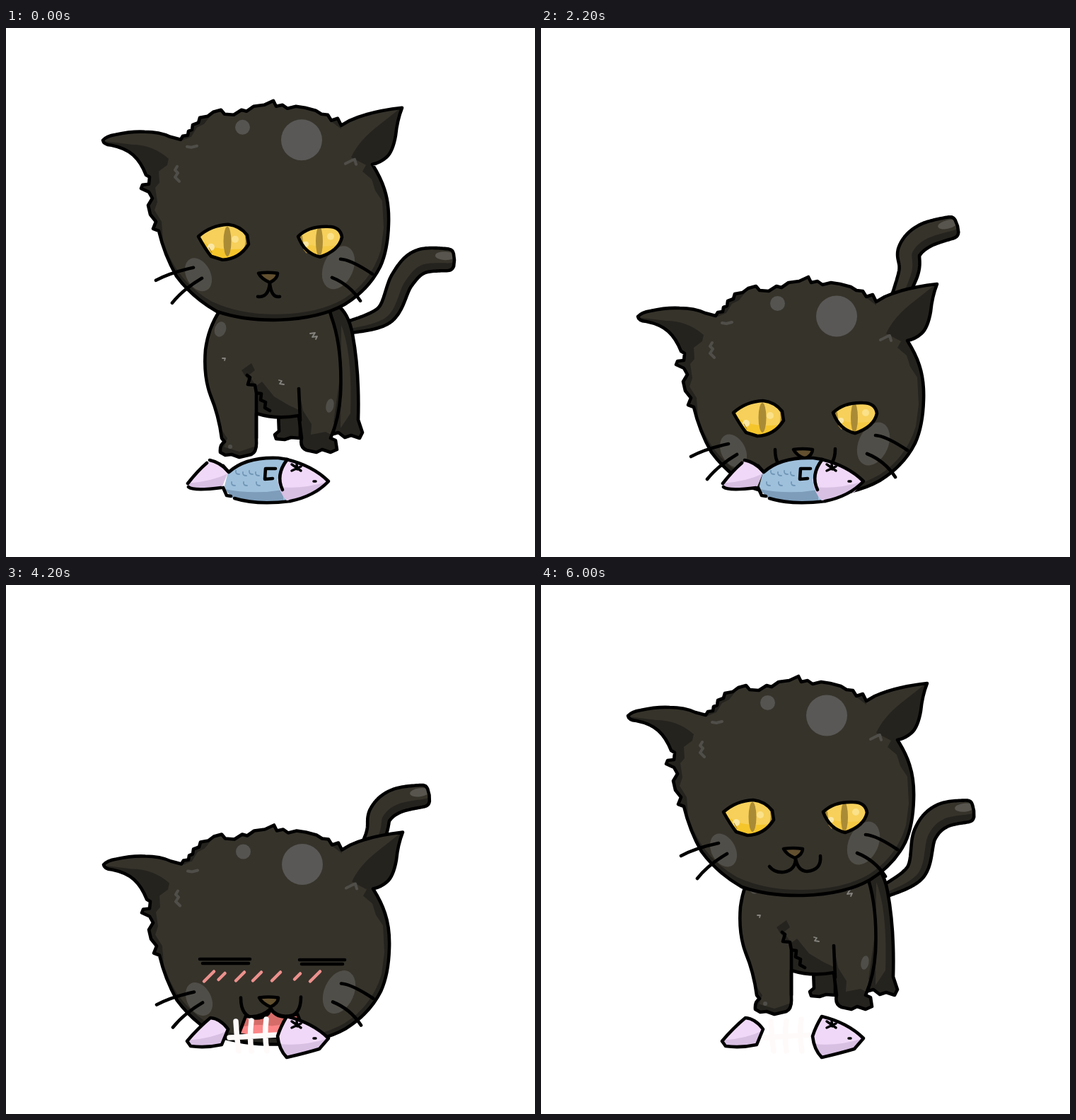
Animation of 748 by 748 pixels, one loop 6200 ms. Source, as an HTML page:

```html
<!DOCTYPE html>
<html lang="en">
<head>
<meta charset="utf-8">
<title>Hungry cat</title>
<style>
  html, body { margin: 0; width: 100%; height: 100%; overflow: hidden; background: #fff; }
  svg { display: block; width: 100vw; height: 100vh; }
  .ink { stroke: #000; stroke-width: 4.6; stroke-linecap: round; stroke-linejoin: round; }
  .line { fill: none; }
  .fur { fill: #36332b; }
  .dark { fill: #25231e; }
  .spot { fill: #504e48; }
  .mark { fill: none; stroke: #504e48; stroke-width: 4; stroke-linecap: round; stroke-linejoin: round; }
  .fine { stroke: #85837e; stroke-width: 1.8; }
  .pink { fill: #f0d9f8; }
  .lilac { fill: #d8c0e3; }
  .blue { fill: #9fc0db; }
  .steel { fill: #7d9dba; }
  .flesh { fill: #df4544; }
  .bone { fill: none; stroke: #fffafa; stroke-width: 7.5; stroke-linecap: round; }
</style>
</head>
<body>
<svg viewBox="0 0 748 748">
  <defs>
    <path id="skull" d="M137 158Q142 152 155 150Q177 145 196 146Q217 146 232 153L247 157L250 152L257 151L258 145L263 143L264 136L272 133L274 126L285 124L293 118L304 115L309 121L322 122L333 115L340 117L350 110L365 108L378 102L382 110L391 108L398 113L410 110L423 112L438 116L446 121L455 122L460 130L469 127L474 137L486 130Q515 117 560 112Q553 130 551 151Q547 174 538 182Q529 190 518 192Q530 211 535 227Q542 248 541 276Q540 313 529 337Q513 369 479 390Q444 410 385 412Q336 413 298 400Q263 380 241 350Q224 320 216 286L208 283L212 273L204 263L201 250L207 240L202 231L191 226L193 221L202 220L203 210L198 207Q191 189 180 179Q169 169 149 165Q138 164 137 158Z"/>
    <path id="torso" d="M302 400Q286 424 282 455Q279 492 289 519Q301 548 305 580L309 585Q302 589 303 600L310 604L319 603L330 607L347 603Q355 599 354 584L354 545Q383 554 414 548L418 580Q415 593 425 597L439 600L447 596L459 600L468 596L466 583L459 580Q471 552 473 518Q476 452 460 408L452 380H315Z"/>
    <path id="eyeL" d="M272 293Q290 277 314 276Q331 278 341 291L343 304Q330 325 306 326L290 321Q282 311 272 293Z"/>
    <path id="eyeR" d="M413 293Q428 278 455 279Q473 279 475 294Q471 313 444 322Q422 317 413 293Z"/>
    <path id="fishBody" d="M314 628Q339 606 385 608Q424 609 457 641Q434 662 402 669Q355 676 320 664L308 651Z"/>
    <path id="finPath" d="M289 612Q303 613 314 628L305 650Q282 655 261 652L256 645Q271 627 289 612Z"/>
    <path id="cheekPath" d="M397 610Q434 619 456 641L443 656Q423 662 397 668Q386 657 384 638Q388 625 397 610Z"/>
    <path id="gapePath" d="M338 372Q358 376 373 362Q386 378 411 369L422 397Q376 406 328 398Z"/>
    <clipPath id="inSkull"><use href="#skull"/></clipPath>
    <clipPath id="inTorso"><use href="#torso"/></clipPath>
    <clipPath id="inEyeL"><use href="#eyeL"/></clipPath>
    <clipPath id="inEyeR"><use href="#eyeR"/></clipPath>
    <clipPath id="inFish"><use href="#fishBody"/></clipPath>
    <clipPath id="inFin"><use href="#finPath"/></clipPath>
    <clipPath id="inCheek"><use href="#cheekPath"/></clipPath>
    <clipPath id="inGape"><use href="#gapePath"/></clipPath>
  </defs>

  <g id="tail">
    <path id="tailFur" class="fur"/>
    <path id="tailShade" class="dark"/>
    <ellipse id="tailShine" rx="14" ry="6" fill="#57554e"/>
    <path id="tailEdge" class="ink line"/>
  </g>

  <g id="body">
    <path class="ink dark" d="M385 545L386 570L380 575L382 581L394 582L403 579L416 580V545Z"/>
    <path class="ink dark" d="M455 385L468 392Q484 402 490 433Q500 487 498 554L504 572L500 580L488 576L479 579L470 572L463 574Z"/>
    <path class="fur" d="M474 420Q490 460 487 545L473 566Z"/>
    <use href="#torso" class="fur"/>
    <g clip-path="url(#inTorso)">
      <path class="dark" d="M333 484L347 474L352 484L343 491L354 506L362 500L379 521L399 533L414 540V556H353V510L338 492ZM414 510L420 541L432 560L431 575L452 571L469 580V604H416ZM278 480Q293 555 313 580L304 604L296 590ZM474 480L463 558L480 550ZM303 591L330 599L354 591V609H303Z"/>
      <ellipse class="spot" cx="303" cy="426" rx="8" ry="11" transform="rotate(20 303 426)"/>
      <ellipse class="spot" cx="458" cy="534" rx="5.5" ry="10" transform="rotate(12 458 534)"/>
      <circle class="spot" cx="317" cy="592" r="3"/>
    </g>
    <use href="#torso" class="ink line"/>
    <path class="ink line" d="M341 491L345 494L342 504L352 505L354 516L361 517L360 526L367 529L366 537L373 541M354 515V580M414 510L416 555"/>
    <path class="mark fine" d="M430 432L437 431L433 437L440 436L438 440M306 467L310 467L309 470M386 498L390 499L387 503L393 504"/>
  </g>

  <g id="head">
    <use href="#skull" class="fur"/>
    <g clip-path="url(#inSkull)">
      <path class="dark" d="M130 158L177 164Q207 164 230 184L228 193L216 202L217 218L211 225L214 245L210 257L220 273L222 299Q239 356 291 386Q332 405 385 404Q442 403 478 382Q517 357 530 313L534 282L532 244L522 229L517 213L504 202L509 193L488 182Q498 160 523 140L561 110L570 420H130Z"/>
      <path class="dark" d="M246 154L257 148L263 140L274 133L276 124L292 120L280 135L270 140L262 153L250 158ZM448 119L474 128V142L462 133Z"/>
    </g>
    <circle cx="418" cy="157.500" r="29" fill="#595856"/>
    <circle cx="334.500" cy="139.500" r="10.500" fill="#555450"/>
    <path class="mark" d="M242 195L239 200L243 204L239 210L245 216M256 167L262 168L270 166M480 191L490 186L493 185L495 192"/>
    <ellipse class="spot" cx="272" cy="348" rx="17" ry="25" transform="rotate(-28 272 348)"/>
    <ellipse class="spot" cx="470" cy="338" rx="21" ry="32" transform="rotate(24 470 338)"/>
    <use href="#skull" class="ink line"/>
    <path class="ink line" d="M212 356Q232 345 265 338M235 388Q250 369 277 353M473 326Q488 327 518 347M461 352Q486 362 501 385"/>

    <g id="eyesOpen" transform="translate(0 1)">
      <g clip-path="url(#inEyeL)">
        <path fill="#f6d05a" d="M265 270H350V330H265Z"/>
        <path fill="#f5c52c" d="M270 290Q287 318 344 309V330H270Z"/>
        <ellipse cx="313" cy="300" rx="5.500" ry="21" fill="#aa8b35"/>
        <path fill="#aa8b35" d="M336 286L346 300L334 314Q342 302 336 286Z"/>
        <circle cx="290" cy="308" r="5" fill="#fbe7a5"/>
        <circle cx="324" cy="297" r="5" fill="#fbe18a"/>
      </g>
      <g clip-path="url(#inEyeR)">
        <path fill="#f6d05a" d="M405 270H480V325H405Z"/>
        <path fill="#f5c944" d="M410 295Q430 313 475 304V325H410Z"/>
        <ellipse cx="443" cy="300" rx="5" ry="21" fill="#aa8b35"/>
        <path fill="#aa8b35" d="M413 293L419 292L422 316L414 306Z"/>
        <circle cx="424" cy="304" r="4" fill="#fbe7a5"/>
        <circle cx="459" cy="293" r="5" fill="#fbe18a"/>
      </g>
      <path class="mark" style="stroke:#b79131;stroke-width:1.300" d="M283 309L287 315M287 309L291 316M421 311L425 316M424 310L428 314"/>
      <use href="#eyeL" class="ink line"/>
      <use href="#eyeR" class="ink line"/>
    </g>
    <path id="eyesShut" class="ink line" d="M273 291.500H344M277 297.500H342M414 292.500H478M417 298.500H475"/>
    <path id="blush" class="mark" style="stroke:#ec918d;stroke-width:4.500"/>

    <g id="gape">
      <use href="#gapePath" fill="#d66c68"/>
      <path clip-path="url(#inGape)" fill="#fc8687" d="M325 389Q352 382 375 386Q402 381 425 388V408H325Z"/>
      <path fill="#fff" d="M341 374L349 374L346 386ZM394 373L403 372L400 384Z"/>
      <use href="#gapePath" class="ink line"/>
    </g>
    <path id="drool" fill="#a6e5f7" d="M383 379L390 376L401 374L404 383L399 386L399 392L393 388L387 386Z"/>
    <path id="lips" class="ink line"/>
    <path class="ink" fill="#62502f" d="M357 346Q370 344 384 346Q384 354 373 359Q361 354 357 346Z"/>
  </g>

  <g id="fish">
    <use href="#finPath" class="pink"/>
    <path clip-path="url(#inFin)" class="lilac" d="M250 644Q288 643 316 629V657H250Z"/>
    <path id="finEdge" class="ink line"/>

    <g id="flank">
      <g clip-path="url(#inFish)">
        <path id="meat" class="blue"/>
        <path class="steel" d="M300 650Q345 661 392 653V678H300Z"/>
        <path id="scales" class="mark" style="stroke:#7197b7;stroke-width:1.800"/>
      </g>
      <path class="ink line" d="M307 650L312 661L318 662M323 665Q355 675 402 669"/>
    </g>
    <path id="back" class="ink line" d="M307 619L315 628Q339 606 385 608L398 610"/>
    <path id="hook" class="ink line" d="M381 623L367 623L366 638L377 637"/>
    <g id="bite">
      <path class="ink flesh" d="M314 622Q317 630 329 629Q344 632 356 627Q370 627 378 615Q379 627 367 632Q343 638 315 630Z"/>
      <path class="bone" d="M325 617V629M346 615L344 631M367 613L365 626"/>
    </g>
    <g id="wound">
      <path class="ink flesh" d="M315 631Q350 622 388 631L390 654L380 655Q374 665 362 657Q354 666 343 659Q330 663 328 654Q314 653 313 640Z"/>
      <path class="dark" d="M316 630Q350 621 387 630L386 635Q350 628 316 636Z"/>
    </g>
    <path id="bones" class="bone"/>

    <use href="#cheekPath" class="pink"/>
    <path clip-path="url(#inCheek)" class="lilac" d="M380 648Q416 654 459 640V675H380Z"/>
    <path id="cheekEdge" class="ink line"/>
    <path class="ink line" style="stroke-width:3.500" d="M404 617L417 626M404 626L417 620M411 617L412 624M435 641L438 641"/>
  </g>
</svg>
<script>
const LOOP = 6200, STEP = 200;
const $ = id => document.getElementById(id);
const draw = (id, d) => $(id).setAttribute('d', d);
const show = (id, on) => { $(id).style.display = on ? '' : 'none'; };

// Head offset: time, x, y
const headKeys = [
  [0, 0, 0.8], [800, 0, 158], [1200, 0, 158], [1800, 0, 203.5], [2200, 0, 250],
  [2800, 0, 250], [3200, 0, 250], [3600, 1, 225], [4000, 1, 250],
  [4400, 1, 225], [4800, 1, 250], [5600, -22, 70], [6000, -14, 27]
];

// Tail centre lines from root to tip
const pose = {
  low: [482, 424, 536, 405, 560, 356, 587, 330, 634, 328],
  right: [485, 424, 536, 393, 563, 358, 598, 350, 645, 374],
  up: [490, 420, 509, 330, 502, 298, 513, 267, 541, 244],
  swing: [490, 420, 531, 360, 538, 318, 560, 297, 609, 287],
  curl: [490, 420, 519, 348, 521, 315, 544, 293, 589, 280],
  flat: [485, 424, 530, 378, 555, 350, 582, 340, 627, 348],
  rest: [484, 434, 530, 405, 543, 352, 568, 326, 612, 319]
};
const tailKeys = [
  [0, 'low'], [800, 'right'], [1200, 'flat'], [1800, 'up'], [2200, 'curl'], [2400, 'up'],
  [2800, 'swing'], [3200, 'low'], [3600, 'curl'], [4000, 'curl'], [4800, 'flat'], [6000, 'rest']
].map(([time, name]) => [time, ...pose[name]]);

const lips = {
  frown: 'M356 379Q371 381 373 360Q375 381 387 379',
  smile: 'M337 371Q344 380 357 379Q374 376 374 360Q377 377 390 378Q411 376 409 356',
  wide: 'M331 346Q331 374 352 375Q372 374 373 360Q379 374 397 373Q416 371 416 345'
};

function sample(keys, t) {
  const i = keys.findIndex(k => k[0] > t);
  if (i < 0) return keys[keys.length - 1].slice(1);
  const a = keys[i - 1], b = keys[i], u = (t - a[0]) / (b[0] - a[0]);
  return a.slice(1).map((v, n) => v + (b[n + 1] - v) * u);
}

// Catmull-Rom value through a list at position s
function spline(list, s) {
  const last = list.length - 1, i = Math.min(Math.floor(s), last - 1), u = s - i;
  const at = n => list[Math.max(0, Math.min(last, n))];
  const [a, b, c, d] = [at(i - 1), at(i), at(i + 1), at(i + 2)];
  return b + u / 2 * (c - a + u * (2 * a - 5 * b + 4 * c - d + u * (3 * (b - c) + d - a)));
}

function drawTail(points) {
  const xs = points.filter((_, i) => i % 2 === 0), ys = points.filter((_, i) => i % 2);
  const widths = [8, 13.5, 16, 17, 15], tipStart = 3.6;
  const edge = (s, side) => {
    const e = 0.02, s0 = Math.max(0, s - e), s1 = Math.min(4, s + e);
    const dx = spline(xs, s1) - spline(xs, s0), dy = spline(ys, s1) - spline(ys, s0);
    const round = Math.max(0, (s - tipStart) / (4 - tipStart));
    const cap = Math.sqrt(Math.max(0, 1 - round ** 4));
    const w = spline(widths, s) * cap * side / Math.hypot(dx, dy);
    return [spline(xs, s) - dy * w, spline(ys, s) + dx * w];
  };
  const ribbon = (from, to) => {
    const near = [], far = [];
    for (let i = 0; i <= 100; i++) {
      near.push(edge(i / 25, from));
      far.unshift(edge(i / 25, to));
    }
    return 'M' + [...near, ...far].map(p => p.map(v => v.toFixed(1)).join(' ')).join('L') + 'Z';
  };
  draw('tailFur', ribbon(-1, 1));
  draw('tailEdge', ribbon(-1, 1));
  draw('tailShade', ribbon(0.3, 1));
  const [x, y] = edge(3.66, -0.35), [a, b] = edge(3.5, 0), [c, d] = edge(3.8, 0);
  const angle = Math.atan2(d - b, c - a) * 180 / Math.PI;
  $('tailShine').setAttribute('transform', `translate(${x} ${y}) rotate(${angle})`);
}

function drawFish(t) {
  const stage = t < 2600 ? 0 : t < 3400 ? 1 : t < 4200 ? 2 : 3;
  show('flank', stage < 3);
  show('back', stage === 0);
  show('hook', stage < 2);
  show('bite', stage === 1);
  show('wound', stage === 2);
  show('bones', stage > 1);
  draw('meat', [
    'M300 600H400V680H300Z',
    'M300 626Q345 641 372 630L386 610H400V680H300Z',
    'M300 647Q340 657 400 655V680H300Z'
  ][Math.min(stage, 2)]);
  let arcs = '';
  const rows = [[629, 325, 344], [631, 335, 353], [645, 319, 336, 354]];
  rows.slice(stage ? 2 : 0, stage > 1 ? 2 : 3).forEach(([y, ...xs]) =>
    xs.forEach(x => { arcs += `M${x} ${y - 3}q-1 5 5 5`; }));
  draw('scales', arcs);
  const low = stage === 3 ? 659 : 653;
  draw('bones', `M316 640L384 636M325 617Q326 638 329 ${low}M347 616Q344 638 347 ${low}M368 614Q365 636 369 ${low}`);
  draw('finEdge', stage > 1
    ? $('finPath').getAttribute('d')
    : 'M284 615Q271 626 257 644M258 649Q265 655 304 650M288 611Q303 614 314 627');
  draw('cheekEdge', stage > 2
    ? $('cheekPath').getAttribute('d')
    : 'M397 611Q381 632 391 653M397 610Q434 619 456 641Q436 662 402 669');
}

function render(t) {
  const [x, y] = sample(headKeys, t);
  $('head').setAttribute('transform', `translate(${x} ${y})`);
  drawTail(sample(tailKeys, t));
  drawFish(t);

  const shut = (t >= 600 && t < 1400) || (t >= 2600 && t < 5200);
  const wide = t >= 1400 && t < 5200;
  show('eyesOpen', !shut);
  show('eyesShut', shut);
  show('blush', t >= 2600 && t < 5200);
  show('drool', t >= 800 && t < 1400);
  show('gape', wide && !(t >= 2600 && t < 3400));
  draw('lips', t < 600 ? lips.frown : wide ? lips.wide : lips.smile);
}

draw('blush', [[286, 7], [304, 4.5], [330, 6], [354, 6], [381, 6], [411, 4], [436, 7]]
  .map(([x, r]) => `M${x - r} ${316 + r}L${x + r} ${316 - r}`).join(''));

const start = performance.now();
function tick() {
  const t = (performance.now() - start) % LOOP;
  render(Math.floor(t / STEP) * STEP);
  requestAnimationFrame(tick);
}
tick();
</script>
</body>
</html>
```
